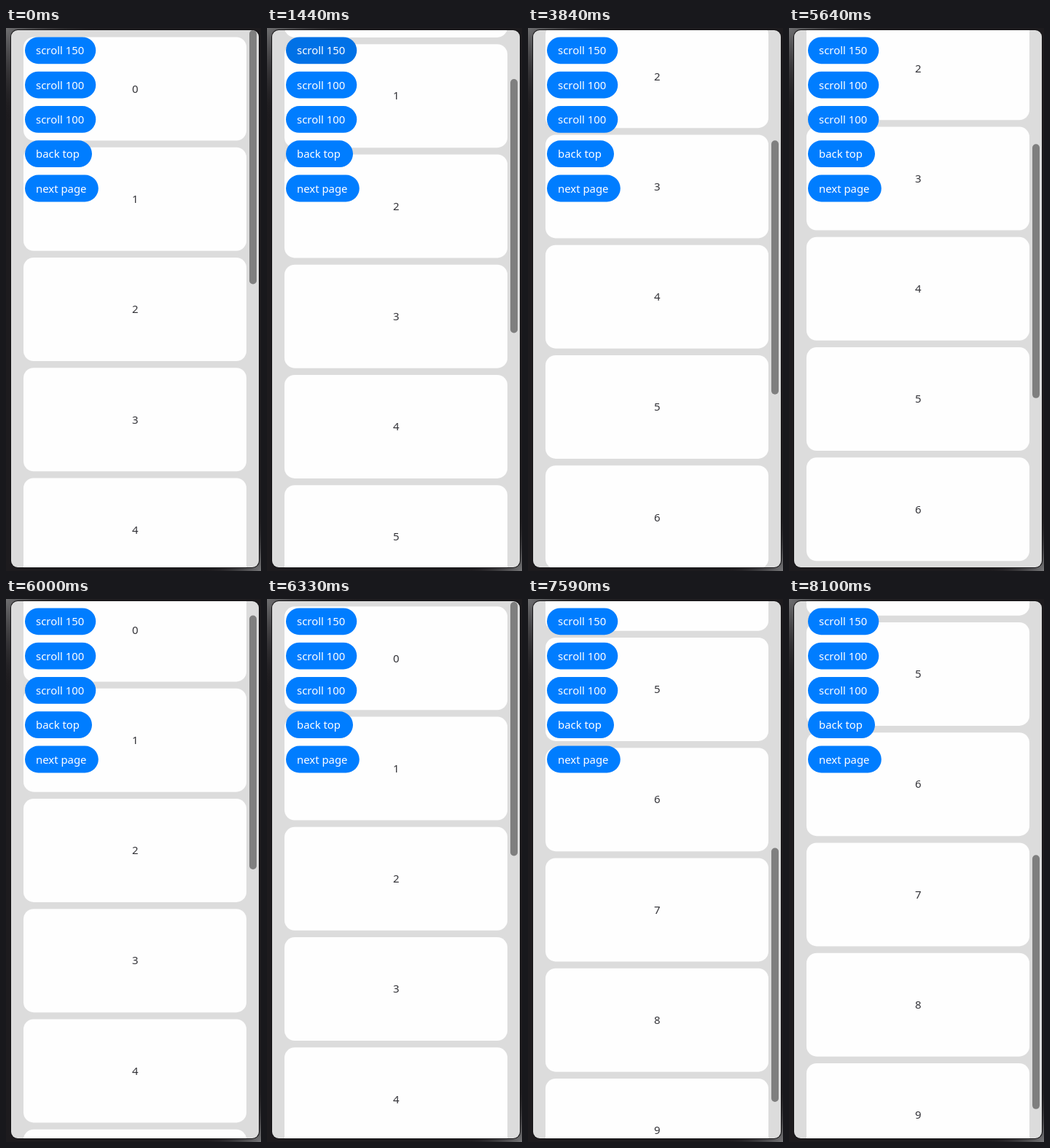
An HTML page with a canvas for the animation above (9360 ms loop, 350 px wide and 745 px high).

```html
<!DOCTYPE html>
<html lang="en">
<head>
<meta charset="utf-8">
<title>Scroll demo</title>
<style>
  html, body { margin: 0; width: 100%; height: 100%; overflow: hidden; background: #1d1b1e; }
  canvas { display: block; width: 350px; height: 745px; }
</style>
</head>
<body>
<canvas id="stage"></canvas>
<script>
const W = 350, H = 745, LOOP = 9360;
const PANEL = { x: 7, y: 3, w: 340, h: 737 };
const CARD = { x: 24, y: 12.5, w: 306, h: 142, pitch: 151.25, count: 10 };
const BAR = { x: 334, w: 10, h: 348.5, ratio: 0.4728 };
const FONT = '"Noto Sans", "Open Sans", sans-serif';

// press / release: touch times in ms; to: scroll offset; speed: spring rate, 0 jumps
const buttons = [
  { label: 'scroll 150', w: 97.3, press: 1140, release: 1380, to: 141.6, speed: 0 },
  { label: 'scroll 100', w: 97.3, press: 2400, release: 2490, to: 236, speed: 0 },
  { label: 'scroll 100', w: 97.3, press: 3570, release: 3610, to: 330.7, speed: 1.2 },
  { label: 'back top', w: 92, press: 5640, release: 5732, to: 0, speed: 1 },
  { label: 'next page', w: 100.8, press: 7110, release: 7171, to: 737, speed: 1 }
];

const canvas = document.getElementById('stage');
const ctx = canvas.getContext('2d');
const dpr = window.devicePixelRatio || 1;
canvas.width = W * dpr;
canvas.height = H * dpr;
ctx.scale(dpr, dpr);

const clamp = v => Math.min(1, Math.max(0, v));

// Overdamped spring: stiffness 227, damping 33, mass 1
function spring(sec) {
  const d = Math.sqrt(16.5 ** 2 - 227), slow = 16.5 - d, fast = 16.5 + d;
  return 1 - (fast * Math.exp(-slow * sec) - slow * Math.exp(-fast * sec)) / (2 * d);
}

function scrollAt(t) {
  let pos = 0;
  for (const b of buttons) {
    if (t < b.release) break;
    const k = b.speed ? spring((t - b.release) / 1000 * b.speed) : 1;
    pos += (b.to - pos) * k;
  }
  return pos;
}

function pressAt(b, t) {
  return clamp((t - b.press) / 100) * (1 - clamp((t - b.release - 60) / 150));
}

// The screen updates every 60 ms
function sample(t) {
  const shift = t < 7110 ? 0 : 30;
  return Math.floor((t - shift) / 60) * 60 + shift;
}

function roundRect(x, y, w, h, r, fill) {
  ctx.beginPath();
  ctx.roundRect(x, y, w, h, r);
  ctx.fillStyle = fill;
  ctx.fill();
}

function text(str, x, y, size, weight, color, align) {
  ctx.font = `${weight} ${size}px ${FONT}`;
  ctx.textAlign = align;
  ctx.fillStyle = color;
  ctx.fillText(str, x, y);
}

function glow(x, y, r, color) {
  const g = ctx.createRadialGradient(x, y, 0, x, y, r);
  g.addColorStop(0, color);
  g.addColorStop(1, 'rgba(29,27,30,0)');
  ctx.fillStyle = g;
  ctx.fillRect(0, 0, W, H);
}

function drawBezel() {
  ctx.fillStyle = '#1d1b1e';
  ctx.fillRect(0, 0, W, H);
  glow(0, 0, 130, '#707072');
  glow(W, H, 80, '#78787a');
  roundRect(PANEL.x - 1, PANEL.y - 1, PANEL.w + 2, PANEL.h + 2, 10, '#141315');
}

function drawList(scroll) {
  for (let i = 0; i < CARD.count; i++) {
    const y = CARD.y + i * CARD.pitch - scroll;
    if (y > H || y + CARD.h < 0) continue;
    roundRect(CARD.x, y, CARD.w, CARD.h, 14, '#fefefe');
    text(i, 177.3, y + 76.3, 15, 400, '#333338', 'center');
  }
  roundRect(BAR.x, PANEL.y + scroll * BAR.ratio, BAR.w, BAR.h, 5, '#7f7f7f');
}

function drawButton(b, i, t) {
  const y = 12.4 + i * 47.3;
  const shade = 1 - 0.1 * pressAt(b, t);
  roundRect(26, y, b.w, 36.8, 18.4, `rgb(0,${125 * shade},${255 * shade})`);
  text(b.label, 41, y + 23.9, 14.9, 500, '#fff', 'left');
}

function draw(t) {
  drawBezel();
  ctx.save();
  ctx.beginPath();
  ctx.roundRect(PANEL.x, PANEL.y, PANEL.w, PANEL.h, 9);
  ctx.clip();
  ctx.fillStyle = '#dcdcdc';
  ctx.fillRect(PANEL.x, PANEL.y, PANEL.w, PANEL.h);
  drawList(scrollAt(t));
  buttons.forEach((b, i) => drawButton(b, i, t));
  ctx.restore();
}

const start = performance.now();
function tick() {
  draw(sample((performance.now() - start) % LOOP));
  requestAnimationFrame(tick);
}
tick();
</script>
</body>
</html>
```
